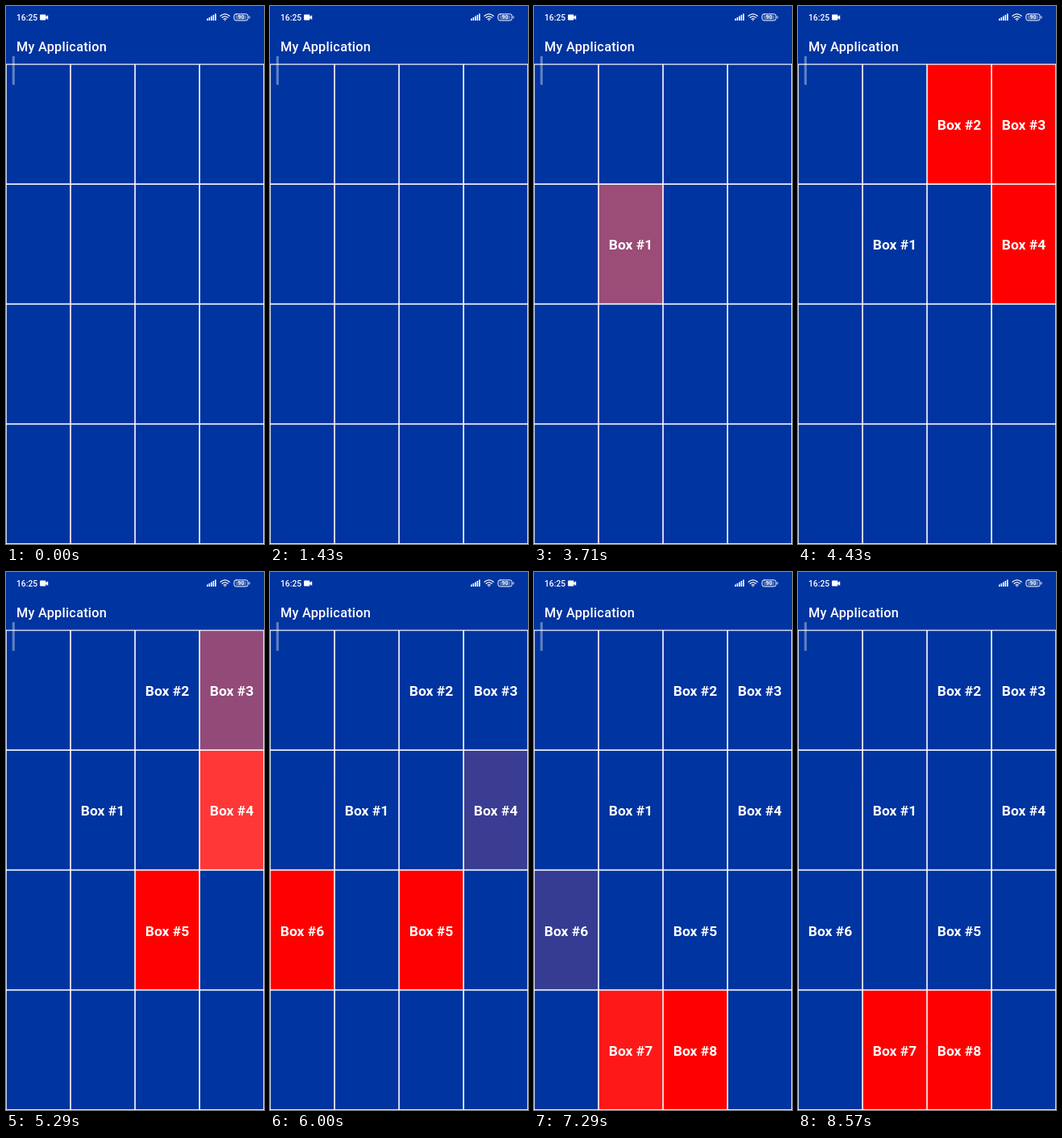
An HTML page that plays this animation: 320 by 665 pixels, repeating every 8.71 s.

```html
<!DOCTYPE html>
<html lang="en">
<head>
<meta charset="utf-8">
<title>My Application</title>
<style>
  html, body { margin: 0; width: 100%; height: 100%; overflow: hidden; background: #0034a0; }
  svg { display: block; width: 100%; height: 100%; }
  text { font-family: Roboto, sans-serif; fill: #fff; }
  .title { font-size: 16.3px; font-weight: 500; letter-spacing: .25px; }
  .clock { font-size: 10.3px; font-weight: 500; }
  .level { font-size: 7px; font-weight: 500; text-anchor: middle; }
  .label { font-size: 17.4px; font-weight: 700; text-anchor: middle; }
</style>
</head>
<body>
<svg viewBox="0 0 320 665">
  <rect width="320" height="665" fill="#0034a0"/>
  <rect y="71.5" width="320" height="593.5" fill="#fff"/>
  <g id="cells"></g>

  <text class="clock" x="13" y="18">16:25</text>
  <g fill="#fff">
    <rect x="42" y="10.6" width="7.4" height="7" rx="1"/>
    <path d="M49 13.6 52.2 11.2V17L49 14.8Z"/>
    <path id="signal"/>
  </g>
  <g fill="none" stroke="#fff" stroke-width="1.2" stroke-linecap="round">
    <path d="M266 12.3Q271.6 7.6 277.2 12.3M268 14.3Q271.6 11.3 275.2 14.3M269.9 16.2Q271.6 14.9 273.3 16.2"/>
    <path d="M271.6 17.7v.1"/>
    <rect x="282.9" y="9.9" width="17.2" height="8" rx="2.4" stroke-width="1"/>
    <path d="M302 12.9v2" stroke-width="1"/>
  </g>
  <rect x="284.7" y="11.4" width="13.6" height="5" rx="1" fill="#fff" opacity=".3"/>
  <text class="level" x="291.5" y="16.4">90</text>

  <text class="title" x="13" y="55.7">My Application</text>
  <rect x="7.8" y="62" width="3" height="35.5" rx=".5" fill="#fff" opacity=".38"/>
</svg>
<script>
const LOOP = 8710, STEP = LOOP / 61;
const CELL_W = 80, CELL_H = 148.25, TOP = 71.9, GAP = 0.8;
const RED = [255, 0, 0], PALE = [255, 92, 92], BLUE = [0, 52, 160];
const PALE_PART = 0.16;

// Each box turns red at `on`, starts to fade at `off`; `again` makes it red for good.
const boxes = [
  { col: 1, row: 1, on: 2270, off: 3080 },
  { col: 2, row: 0, on: 3690, off: 4430, fade: 840 },
  { col: 3, row: 0, on: 3980, off: 4765 },
  { col: 3, row: 1, on: 4270, off: 5187 },
  { col: 2, row: 2, on: 5120, off: 6240 },
  { col: 0, row: 2, on: 5690, off: 6457 },
  { col: 1, row: 3, on: 6410, off: 7240, again: 7400 },
  { col: 2, row: 3, on: 7120, off: LOOP }
];

function add(parent, name, attributes) {
  const node = document.createElementNS("http://www.w3.org/2000/svg", name);
  for (const key in attributes) node.setAttribute(key, attributes[key]);
  return parent.appendChild(node);
}

const rgb = color => `rgb(${color.map(Math.round)})`;
const mix = (a, b, p) => a.map((v, i) => v + (b[i] - v) * p);

function colorAt(box, time) {
  if (time < box.on) return BLUE;
  if (time < box.off || time >= box.again) return RED;
  const p = Math.min(1, (time - box.off) / (box.fade || 1000));
  return p < PALE_PART
    ? mix(RED, PALE, p / PALE_PART)
    : mix(PALE, BLUE, (p - PALE_PART) / (1 - PALE_PART));
}

const cells = document.getElementById("cells");
for (let i = 0; i < 16; i++) {
  const col = i % 4, row = Math.floor(i / 4);
  const x = col * CELL_W, y = TOP + row * CELL_H;
  const rect = add(cells, "rect", {
    x: x + GAP, y: y + GAP, width: CELL_W - 2 * GAP, height: CELL_H - 2 * GAP, fill: rgb(BLUE)
  });
  const index = boxes.findIndex(box => box.col === col && box.row === row);
  if (index < 0) continue;
  const label = add(cells, "text", { class: "label", x: x + CELL_W / 2, y: y + CELL_H / 2 + 7.2 });
  label.textContent = `Box #${index + 1}`;
  Object.assign(boxes[index], { rect, label });
}

let bars = "";
for (let i = 0; i < 5; i++) {
  const height = 2.4 + i * 1.5;
  bars += `M${249 + i * 2.5} 18v${-height}h1.6v${height}z`;
}
document.getElementById("signal").setAttribute("d", bars);

function draw(now) {
  const time = Math.floor((now % LOOP) / STEP) * STEP;
  for (const box of boxes) {
    box.rect.setAttribute("fill", rgb(colorAt(box, time)));
    box.label.setAttribute("visibility", time < box.on ? "hidden" : "visible");
  }
}

const start = performance.now();
function tick() {
  draw(performance.now() - start);
  requestAnimationFrame(tick);
}
tick();
</script>
</body>
</html>
```
